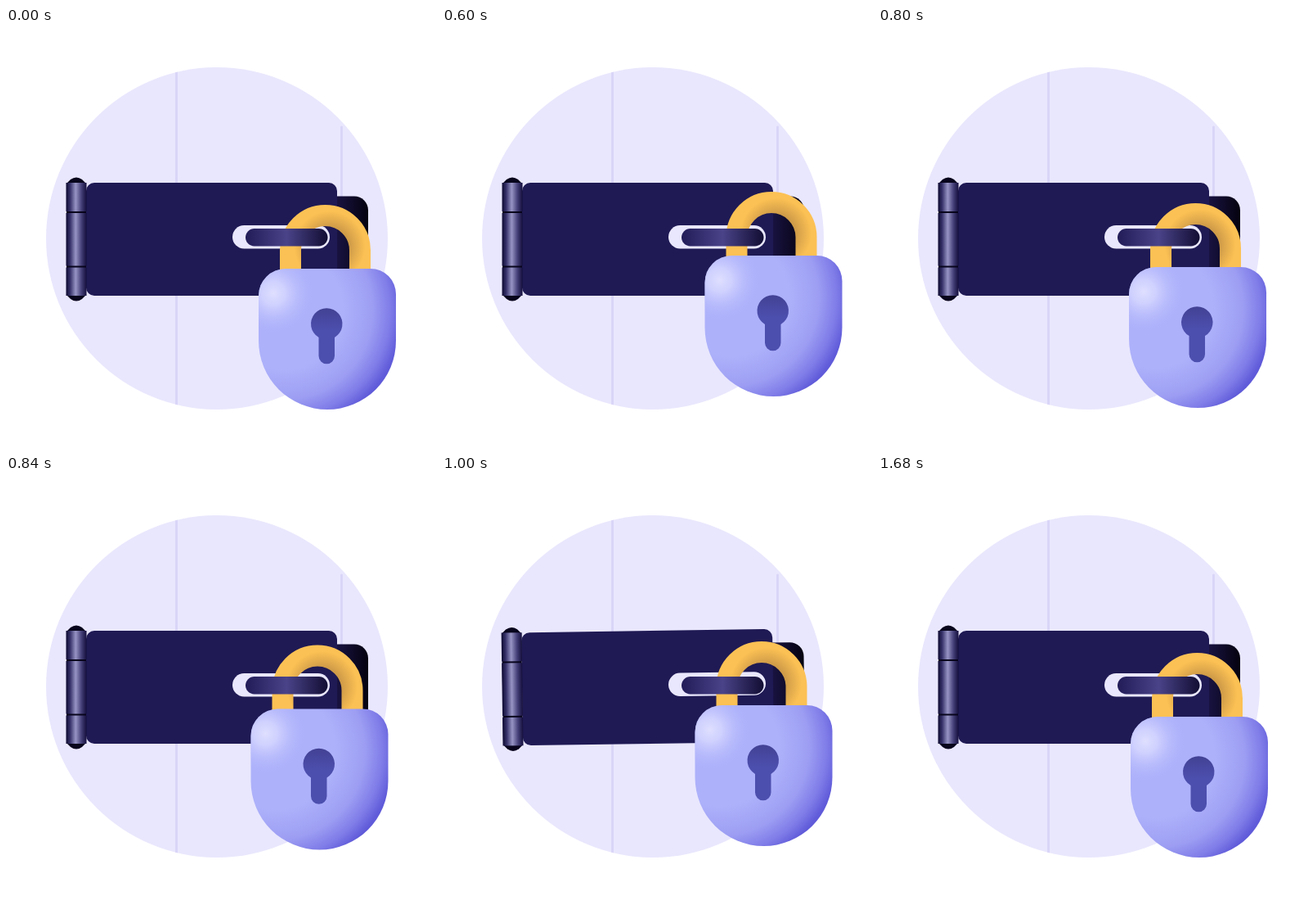
Write an HTML page that moves like this. It is 526 by 513 pixels and loops after 1.72 s.

```html
<!DOCTYPE html>
<html lang="en">
<head>
<meta charset="utf-8">
<title>Padlock</title>
<style>
  html, body { margin: 0; height: 100%; overflow: hidden; background: #fff; }
  svg { display: block; width: 526px; height: 513px; }
</style>
</head>
<body>
<svg viewBox="0 0 526 513">
  <defs>
    <clipPath id="disc"><circle cx="258" cy="257" r="209"/></clipPath>
    <linearGradient id="pin">
      <stop offset="0" stop-color="#0d0930"/><stop offset=".2" stop-color="#37336a"/>
      <stop offset=".47" stop-color="#9794c4"/><stop offset=".75" stop-color="#454078"/>
      <stop offset="1" stop-color="#130e3b"/>
    </linearGradient>
    <linearGradient id="back" gradientUnits="userSpaceOnUse" x1="395" x2="443" y1="0" y2="0">
      <stop offset="0" stop-color="#1d174d"/><stop offset="1" stop-color="#05020f"/>
    </linearGradient>
    <linearGradient id="bar">
      <stop offset="0" stop-color="#221c58"/><stop offset=".5" stop-color="#4a4389"/>
      <stop offset="1" stop-color="#120e33"/>
    </linearGradient>
    <radialGradient id="gold" gradientUnits="userSpaceOnUse" cx="396" cy="267" r="53">
      <stop offset=".45" stop-color="#cf9b48"/><stop offset=".82" stop-color="#fcc154"/>
    </radialGradient>
    <radialGradient id="body" gradientUnits="userSpaceOnUse" cx="340" cy="345" r="150">
      <stop offset=".48" stop-color="#adb1fa"/><stop offset=".72" stop-color="#9d9ef3"/>
      <stop offset=".87" stop-color="#7f7ce8"/><stop offset=".97" stop-color="#605bd9"/>
    </radialGradient>
    <radialGradient id="shine" gradientUnits="userSpaceOnUse" cx="327" cy="324" r="48">
      <stop offset="0" stop-color="#dfdfff"/><stop offset=".3" stop-color="#d6d7ff" stop-opacity=".85"/>
      <stop offset="1" stop-color="#b4b8fc" stop-opacity="0"/>
    </radialGradient>
    <linearGradient id="hole" x2="0" y2="1">
      <stop offset="0" stop-color="#424194"/><stop offset=".4" stop-color="#4d4fae"/>
    </linearGradient>
    <path id="shell" d="M309 327A33 33 0 0 1 342 294H446A31 31 0 0 1 477 325V382A84 84 0 0 1 309 382Z"/>
  </defs>

  <g clip-path="url(#disc)">
    <path fill="#e9e7fd" d="M40 40H480V480H40Z"/>
    <path stroke="#d9d5f8" stroke-width="3" d="M208.500 40V480"/>
    <path stroke="#d9d5f8" stroke-width="3" stroke-linecap="round" d="M410.500 121V330"/>
  </g>

  <g id="hasp">
    <rect x="380" y="205.500" width="63" height="105" rx="17" fill="url(#back)"/>
    <rect x="98" y="189" width="307" height="138" rx="10" fill="#1f1a54"/>
    <path fill="#07041c" d="M74 190L79 185Q86 180 93 185L98 190V326L93 331Q86 336 79 331L74 326Z"/>
    <path fill="url(#pin)" d="M73.500 189H98.500V224H73.500ZM73.500 226H98.500V290.500H73.500ZM73.500 292.500H98.500V327H73.500Z"/>
    <rect x="277" y="241" width="119" height="28.500" rx="14.250" fill="#e9e7fd"/>
  </g>

  <g class="lock">
    <path fill="none" stroke="url(#gold)" stroke-width="26" d="M348 302V271.500A42.500 42.500 0 0 1 433 271.500V302"/>
  </g>
  <rect x="293" y="245" width="100.500" height="21.500" rx="10.750" fill="url(#bar)"/>
  <g class="lock">
    <use href="#shell" fill="url(#body)"/>
    <use href="#shell" fill="url(#shine)"/>
    <path fill="url(#hole)" d="M382.500 378A19.250 19.250 0 1 1 402 378V400.500A9.750 9.750 0 0 1 382.500 400.500Z"/>
  </g>
</svg>
<script>
  const LOOP = 1720, STEP = 40;
  const hasp = document.getElementById('hasp');
  const lockParts = document.querySelectorAll('.lock');
  const progress = (t, from, to) => Math.min(1, Math.max(0, (t - from) / (to - from)));

  // Lock offset x, y and hasp angle
  function pose(t) {
    if (t < 520) return [0, 0, 0];
    if (t < 840) { // hangs to the right, then whips over to the left
      const x = 1.5 + 11 * Math.cos(Math.PI * progress(t, 520, 840) ** 3.8);
      return [x, x > 0 ? -1.28 * x : x, 0];
    }
    if (t < 1520) { // tossed upwards, lifting the hasp
      const p = progress(t, 840, 1000), arc = 4 * p * (1 - p);
      return [-9.5 + 10 * p, -9.5 - 4.5 * p - 25 * arc, -0.8 * (p + arc)];
    }
    const settle = (1 + Math.cos(Math.PI * progress(t, 1520, 1680))) / 2;
    return [0, 4 * settle, 0.28 * settle];
  }

  function draw(now) {
    const t = Math.floor(now % LOOP / STEP) * STEP;
    const [x, y, angle] = pose(t);
    hasp.setAttribute('transform', `rotate(${angle} 260 256)`);
    for (const part of lockParts) part.setAttribute('transform', `translate(${x} ${y})`);
  }

  const start = performance.now();
  (function tick() {
    draw(performance.now() - start);
    requestAnimationFrame(tick);
  })();
</script>
</body>
</html>
```
